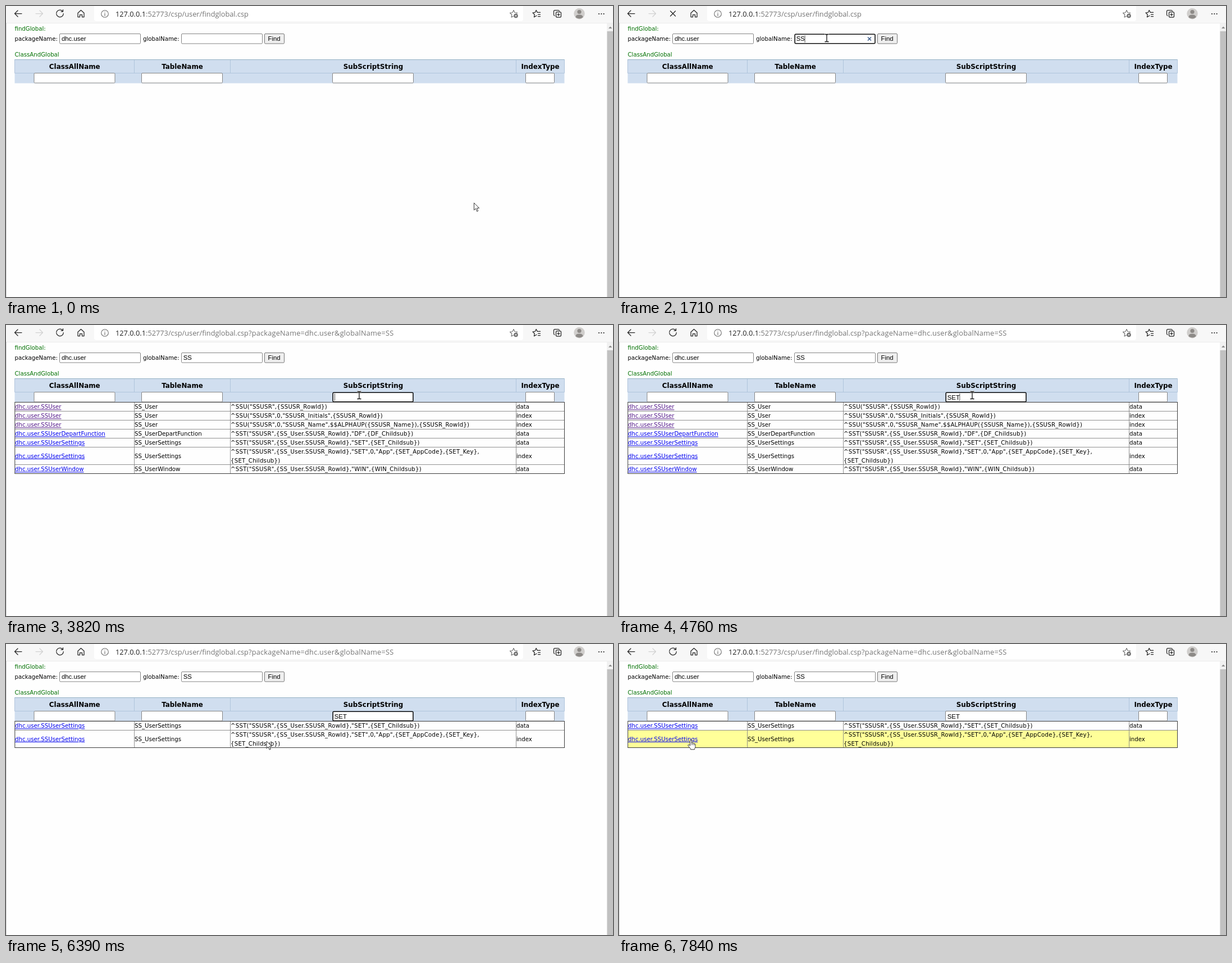
Write an HTML page that moves like this. It is 1081x518 px and loops after 8 s.

```html
<!DOCTYPE html>
<html lang="en">
<head>
<meta charset="utf-8">
<title>findGlobal</title>
<style>
html, body { margin: 0; width: 100%; height: 100%; overflow: hidden; background: #fff; }
svg { display: block; width: 100vw; height: 100vh; }
text { font: 10.2px "DejaVu Sans", Verdana, sans-serif; fill: #000; white-space: pre; }
.green { fill: #007000; }
.head { font-size: 11.9px; font-weight: bold; text-anchor: middle; }
.field { font: 11.33px "Liberation Sans", Arial, sans-serif; }
.url { font: 12.77px "Open Sans", "Noto Sans", sans-serif; fill: #757575; }
.sub { letter-spacing: .22px; }
.link { fill: #0000ee; text-decoration: underline; }
.seen { fill: #551a8b; }
.icon { fill: none; stroke: #262626; stroke-width: 1.25; stroke-linecap: round; stroke-linejoin: round; }
</style>
</head>
<body>
<svg viewBox="0 0 1081 518" preserveAspectRatio="none">
  <rect width="1081" height="518" fill="#fefefe"/>
  <g id="toolbar">
    <rect width="1081" height="30" fill="#f7f7f7"/>
    <path d="M0 30.5H1081" stroke="#ececec"/>
    <path d="M157 0H921V23Q921 27 917 27H161Q157 27 157 23Z" fill="#fff"/>
    <g class="icon">
      <path d="M28 13.5H15.5M21 8L15.5 13.5L21 19"/>
      <path d="M53 13.5H65.5M60 8L65.5 13.5L60 19" stroke="#d2d2d2"/>
      <path d="M128 12.5L133.500 7.500L139 12.500V19.500H135.500V15.500H131.500V19.500H128Z"/>
      <g stroke="#6c6c6c" stroke-width="1.1">
        <circle cx="176" cy="14" r="6.3"/><path d="M176 13V17.5M176 10.6V10.8"/>
        <path d="M904 7.5L906 11.7L910.5 12.3L907.2 15.5L908 20L904 17.9L900 20L900.8 15.5L897.5 12.3L902 11.7Z"/>
      </g>
      <path d="M945 17.2L940.5 19.8L941.3 15.2L938 12L942.3 11.4L944.2 7.5L946.200 11.400H951.500M947.500 15H951.500M947.500 18.500H951.500"/>
      <rect x="979.5" y="10.5" width="9" height="9.5" rx="2"/>
      <path d="M977 17.5Q975.5 17 975.5 15V9.5Q975.5 7.5 977.5 7.5H983Q985 7.5 985.5 9M984 13V17.5M981.8 15.25H986.2"/>
    </g>
    <circle cx="908" cy="17.5" r="4" fill="#555" stroke="#fff" stroke-width=".7"/>
    <path d="M908 15.3V19.7M905.8 17.5H910.2" stroke="#fff"/>
    <circle cx="1021" cy="13.7" r="9.7" fill="#d0cecc"/>
    <circle cx="1021" cy="10.5" r="3.6" fill="#8d8a87"/>
    <path d="M1014.5 20Q1014.5 15.5 1021 15.5T1027.5 20Q1021 25 1014.5 20Z" fill="#8d8a87"/>
    <g fill="#262626"><circle cx="1056" cy="14" r="1.1"/><circle cx="1060.3" cy="14" r="1.1"/><circle cx="1064.6" cy="14" r="1.1"/></g>
  </g>
  <path d="M.5 30V518" stroke="#d4d4d4"/>
  <rect x="1070" y="31" width="11" height="487" fill="#f1f1f1"/>
  <rect x="1070.5" y="45" width="10.5" height="473" fill="#c1c1c1"/>
  <path d="M1073 40L1076.2 36.5L1079.4 40Z" fill="#8a8a8a"/>
  <g id="page"></g>
  <g id="live"></g>
  <g id="pointer"></g>
</svg>
<script>
const LOOP = 8000;
const COLS = [16, 228.5, 399.5, 908.5, 994.5];
const $ = id => document.getElementById(id);
const esc = s => s.replace(/&/g, '&amp;').replace(/</g, '&lt;');
const text = (x, y, s, cls = '') => `<text x="${x}" y="${y}" class="${cls}">${esc(s)}</text>`;
const rect = (x, y, w, h, more) => `<rect x="${x}" y="${y}" width="${w}" height="${h}" ${more}/>`;
const path = (d, more) => `<path d="${d}" ${more}/>`;

const box = (x, y, w = 144, edge = '#858585') =>
  rect(x + .5, y + .5, w, 17.5, `rx="1.5" fill="#fff" stroke="${edge}"`);
const ring = (x, y) =>
  rect(x + 1.2, y + 1.2, 142.8, 16.6, 'rx="1.5" fill="#fff" stroke="#101010" stroke-width="1.6"');
const caret = (x, y) => path(`M${x} ${y}v13`, 'stroke="#222" stroke-width=".8"');

// class, table, subscript lines, index type, visited
const ref = '^SST("SSUSR",{SS_User.SSUSR_RowId},';
const ROWS = [
  ['SSUser', 'SS_User', ['^SSU("SSUSR",{SSUSR_RowId})'], 'data', 1],
  ['SSUser', 'SS_User', ['^SSU("SSUSR",0,"SSUSR_Initials",{SSUSR_RowId})'], 'index', 1],
  ['SSUser', 'SS_User', ['^SSU("SSUSR",0,"SSUSR_Name",$$ALPHAUP({SSUSR_Name}),{SSUSR_RowId})'], 'index', 1],
  ['SSUserDepartFunction', 'SS_UserDepartFunction', [ref + '"DF",{DF_Childsub})'], 'data'],
  ['SSUserSettings', 'SS_UserSettings', [ref + '"SET",{SET_Childsub})'], 'data'],
  ['SSUserSettings', 'SS_UserSettings', [ref + '"SET",0,"App",{SET_AppCode},{SET_Key},', '{SET_Childsub})'], 'index'],
  ['SSUserWindow', 'SS_UserWindow', [ref + '"WIN",{WIN_Childsub})'], 'data']
];

function table(rows, marked) {
  let y = 137.5, cells = '', lines = '', fills = '';
  rows.forEach((row, i) => {
    const [cls, name, subs, type, seen] = row;
    const h = subs.length > 1 ? 31 : 16;
    const mid = y + h / 2 + 3.9;
    if (i === marked) fills += rect(COLS[0], y, 978.5, h, 'fill="#ffff99"');
    cells += text(16, mid, 'dhc.user.' + cls, seen ? 'link seen' : 'link') +
      text(229, mid, name) + text(909, mid, type);
    subs.forEach((s, k) => cells += text(400, y + 11.9 + k * 15.5, s, 'sub'));
    y += h;
    if (i < rows.length - 1) lines += `M16 ${y}H994.5`;
  });
  COLS.slice(1, 4).forEach(x => lines += `M${x} 137.5V${y}`);
  return fills + path(lines, 'stroke="#858585" stroke-width=".9"') +
    rect(15.8, 137.5, 978.7, y - 137.5, 'fill="none" stroke="#3c3c3c"') + cells;
}

function buildPage() {
  const heads = ['ClassAllName', 'TableName', 'SubScriptString', 'IndexType'];
  $('page').innerHTML =
    text(15.5, 44, 'findGlobal:', 'green') +
    text(15.5, 62, 'packageName:') + box(95, 49) + text(99, 62, 'dhc.user', 'field') +
    text(244, 62, 'globalName:') +
    rect(460.5, 49.5, 35, 17.5, 'rx="1.5" fill="#efefef" stroke="#767676"') + text(466.5, 62, 'Find', 'field') +
    text(15.5, 90, 'ClassAndGlobal', 'green') +
    rect(15.5, 95.5, 979, 42, 'fill="#d0deef"') +
    path('M15.5 119.5V95.5H994.5V119.5H15.5' + COLS.slice(1, 4).map(x => `M${x} 96V119`).join(''),
      'fill="none" stroke="#b0c5dc"') +
    path('M15.5 95.5H994.5', 'stroke="#94b0c4"') +
    heads.map((s, i) => text((COLS[i] + COLS[i + 1]) / 2, 112.3, s, 'head')).join('') +
    box(49.5, 119) + box(241, 119) + box(925, 119, 51);
}

function liveView(t) {
  const loaded = t >= 1780, busy = t >= 1710 && !loaded;
  let out = path(busy
    ? 'M91.5 9L100.5 18M100.5 9L91.5 18'
    : 'M100.8 9.3A6.3 6.3 0 1 0 102.3 13.5M101.5 6.5V10H98', 'class="icon"');

  out += `<text class="url" x="195" y="19"><tspan fill="#202020">127.0.0.1</tspan>:52773/csp/user/findglobal.csp</text>`;
  if (loaded) out += `<text class="url" x="432" y="19" letter-spacing=".2">?packageName=dhc.user&amp;globalName=SS</text>`;

  const typed = t < 1320 ? '' : t < 1480 ? 'S' : 'SS';
  const focused = t >= 790 && !loaded;
  const hover = loaded && t < 2240;
  out += focused ? ring(312, 49) : box(312, 49, 144, hover ? '#555' : '#858585');
  out += text(315.8, 62, typed, 'field');
  if (focused) {
    if (t < 1260 || typed) out += caret(316 + typed.length * 7.55, 52);
    if (typed) out += path('M443 55.5L449 61.5M449 55.5L443 61.5', 'stroke="#42608c" stroke-width="1.7"');
  }

  const filter = 'SET'.slice(0, (t >= 4050) + (t >= 4510) + (t >= 4760));
  const filtering = t >= 2800 && t < 6770;
  out += filtering ? ring(581, 119) : box(581, 119);
  out += text(584.8, 132.5, filter, 'field');
  const blink = t < 3280 || (t >= 3820 && t < 5290) || (t >= 5820 && t < 6350);
  if (filtering && blink) out += caret(585.5 + [0, 7.3, 14.9, 21.3][filter.length], 122);

  if (loaded) {
    const rows = t < 5140 ? ROWS : ROWS.filter(r => r[2][0].includes('"SET"'));
    out += table(rows, t >= 6860 ? 1 : -1);
  }
  return out;
}

// start, step length, steps, from, to
const MOVES = [
  [70, 80, 9, [833.5, 350.5], [370, 57]],
  [2240, 80, 7, [370, 57], [629, 125]],
  [5690, 77.8, 10, [629, 125], [464, 173]],
  [7080, 76, 11, [464, 173], [128, 171]]
];
const EASE = [2.1, 2.7]; // y settles sooner than x

function pointerAt(t) {
  let pos = MOVES[0][3];
  for (const [start, step, count, from, to] of MOVES) {
    if (t < start) break;
    const n = Math.min(count, Math.floor((t - start) / step + 1.02));
    pos = from.map((v, i) => to[i] + (v - to[i]) * Math.pow(1 - n / count, EASE[i]));
  }
  return pos;
}

const inside = (x, y, l, t, w, h) => x > l && x < l + w && y > t && y < t + h;
const SHAPES = {
  arrow: path('M0 0V12.8L3 10L5.2 15.2L7.3 14.3L5.1 9.3H9.3Z', 'fill="#fff" stroke="#222" stroke-width=".9"'),
  beam: path('M-4 -6.5H-1L0 -5.5L1 -6.5H4M0 -5.5V5.5M-4 6.5H-1L0 5.5L1 6.5H4', 'fill="none" stroke="#fff" stroke-width="2.6"') +
    path('M-3.5 -6.5H-1L0 -5.5L1 -6.5H3.5M0 -5.5V5.5M-3.5 6.5H-1L0 5.5L1 6.5H3.5', 'fill="none" stroke="#111" stroke-width="1.3"'),
  hand: path('M-1.5 10V1Q-1.5 -.5 -.2 -.5T1.2 1V5.3Q2.5 4.5 3.5 5.8Q5 5 6 6.5Q8 6 8 8.5V11.5Q8 14 6.5 15.5V16.8H-.5V15.5L-5 10Q-5.5 7.8 -3.3 8.3Z',
    'fill="#fff" stroke="#222" stroke-width=".9" stroke-linejoin="round"') +
    path('M1.2 5.5V9M3.6 6V9M6 7V9.5', 'stroke="#222" stroke-width=".7"')
};

function pointerView(t) {
  const [x, y] = pointerAt(t);
  const overField = inside(x, y, 312, 49, 145, 18) || inside(x, y, 581, 119, 145, 18);
  const overLink = t > 7000 && x < 141;
  const shape = overField ? 'beam' : overLink ? 'hand' : 'arrow';
  return `<g transform="translate(${x.toFixed(1)} ${y.toFixed(1)})">${SHAPES[shape]}</g>`;
}

const shown = {};
function put(id, html) {
  if (shown[id] !== html) $(id).innerHTML = shown[id] = html;
}

function draw(t) {
  put('live', liveView(t));
  put('pointer', pointerView(t));
}

buildPage();
draw(0);
const begin = performance.now();
requestAnimationFrame(function tick() {
  draw((performance.now() - begin) % LOOP);
  requestAnimationFrame(tick);
});
</script>
</body>
</html>
```
